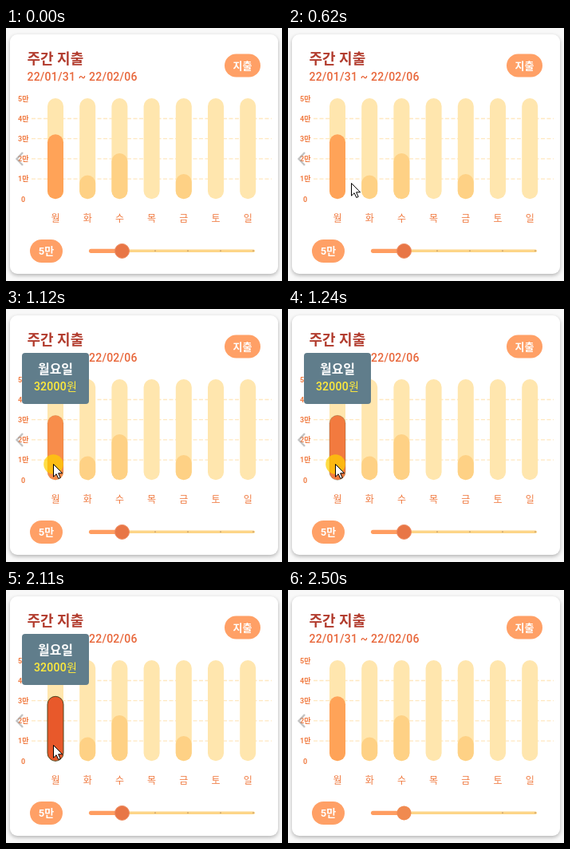
An HTML page for the animation above (2.87 s loop, 346 by 317 pixels).

```html
<!DOCTYPE html>
<html lang="ko">
<head>
<meta charset="utf-8">
<title>주간 지출</title>
<style>
  html, body { margin: 0; width: 100%; height: 100%; overflow: hidden; background: #f8f8f8; }
  .card {
    position: absolute; left: 5px; top: 8px; width: 336px; height: 300px;
    border-radius: 9px; background: #fff; box-shadow: 0 2px 5px rgba(0, 0, 0, .28);
  }
  svg { position: absolute; left: 0; top: 0; display: block; }
  text { font-family: Roboto, "Noto Sans CJK KR", "Noto Sans CJK", sans-serif; }
  .mid { text-anchor: middle; }
  .bold { font-weight: 700; }
  .medium { font-weight: 500; }
  .axis { font-size: 9px; fill: #f07c43; }
  .day { font-size: 12px; fill: #f07c43; }
  .pill { fill: #ffa066; }
  .pillText { font-size: 13px; fill: #fff; }
</style>
</head>
<body>
<div class="card"></div>
<svg width="346" height="317" viewBox="0 0 346 317">
  <text class="bold" x="26.5" y="44.5" font-size="18" fill="#b23c2e">주간 지출</text>
  <text class="medium" x="26.5" y="66" font-size="14" letter-spacing=".22" fill="#e8673b">22/01/31 ~ 22/02/06</text>

  <rect class="pill" x="274" y="32.5" width="45" height="29" rx="14.5"/>
  <text class="mid bold pillText" x="296.5" y="51.8">지출</text>

  <g id="chart"></g>
  <path d="M21 156L13.5 164L21 172" fill="none" stroke="#999" stroke-opacity=".6" stroke-width="2.4"/>

  <rect class="pill" x="30" y="265" width="41" height="29" rx="14.5"/>
  <text class="mid bold pillText" x="50.5" y="284.4">5만</text>

  <rect x="104" y="277.5" width="208" height="3.6" rx="1.8" fill="#fdd588"/>
  <rect x="104" y="276.7" width="42" height="5.2" rx="2.6" fill="#ff9d61"/>
  <g id="ticks" fill="#c9a06a"></g>
  <circle id="thumb" cx="145.5" cy="279.4" r="9"/>

  <g id="tip">
    <rect x="20" y="55" width="84" height="64" rx="4" fill="#607d8b"/>
    <text class="mid bold" x="62" y="80.5" font-size="16" fill="#fff">월요일</text>
    <text class="mid medium" x="62" y="102" font-size="14" letter-spacing=".25" fill="#ffeb3b">32000원</text>
  </g>
  <circle id="press" cx="59.5" cy="194.5" r="12.3" fill="#ffd000" fill-opacity=".72"/>
  <path id="cursor" d="M.5 .5V16.2L4.1 12.7L6.8 18.5L9.2 17.4L6.6 11.8H11.6Z" fill="#fff" stroke="#000"/>
</svg>
<script>
const LOOP = 2870, TOP = 88, BASE = 214.3;
const $ = id => document.getElementById(id);

function add(parent, tag, attrs, label = '') {
  const el = document.createElementNS('http://www.w3.org/2000/svg', tag);
  for (const key in attrs) el.setAttribute(key, attrs[key]);
  el.textContent = label;
  return parent.appendChild(el);
}

const chart = $('chart');
for (let i = 0; i <= 5; i++) {
  const y = BASE - i * 25.2;
  if (i > 0 && i < 5) {
    add(chart, 'line', { x1: 32, x2: 333, y1: y, y2: y, stroke: '#ffe8c0', 'stroke-width': 1.3, 'stroke-dasharray': '5 2.5' });
  }
  add(chart, 'text', { class: 'mid axis bold', x: 21.7, y: y + 3.2 }, i ? i + '만' : '0');
}

const column = (x, y, fill) =>
  add(chart, 'rect', { x: x - 10, y, width: 20, height: BASE - y, rx: 10, fill });
const tops = [133.3, 184.5, 157, 0, 183, 0, 0];
let monday;
[...'월화수목금토일'].forEach((day, i) => {
  const x = 62 + i * 40.2;
  column(x, TOP, '#ffe6ae');
  if (tops[i]) {
    const bar = column(x, tops[i], '#fed185');
    if (!i) monday = bar;
  }
  add(chart, 'text', { class: 'mid day medium', x, y: 243.3 }, day);
});
const ticks = [187, 228, 269, 310].map(cx => add($('ticks'), 'circle', { cx, cy: 279.2, r: .9 }));

// time, cursor x, cursor y (absent when hidden)
const moves = [
  [0], [240, 136, 254], [390, 124, 242], [500, 98, 213], [620, 79, 194],
  [740, 65, 194], [870, 59, 194], [2230, 231, 299], [2390]
];
// time, highlight of the first bar
const glow = [
  [0, 0], [990, .04], [1120, .3], [1240, .55], [1360, .8], [1480, 1],
  [2230, .7], [2390, .25], [2500, 0]
];
const at = (steps, t) => steps.filter(s => s[0] <= t).pop();
const show = (el, on) => el.setAttribute('visibility', on ? 'visible' : 'hidden');
const mix = (a, b, p) => `rgb(${a.map((v, i) => Math.round(v + (b[i] - v) * p))})`;

function draw(t) {
  const [, x, y] = at(moves, t);
  show($('cursor'), x !== undefined);
  if (x !== undefined) $('cursor').setAttribute('transform', `translate(${x} ${y})`);

  const p = at(glow, t)[1];
  monday.setAttribute('fill', mix([255, 163, 88], [232, 89, 43], p));
  monday.setAttribute('stroke', `rgba(80,70,30,${p * p})`);

  show($('press'), t >= 990 && t < 2110);
  show($('tip'), t >= 1120 && t < 2230);

  const rest = t >= 2390;
  $('thumb').setAttribute('fill', rest ? '#f08a50' : '#e87646');
  $('thumb').setAttribute('stroke', rest ? 'none' : '#ee8c60');
  ticks.slice(0, 2).forEach(tick => show(tick, !rest));
}

const start = performance.now();
function loop() {
  draw((performance.now() - start) % LOOP);
  requestAnimationFrame(loop);
}
loop();
</script>
</body>
</html>
```
